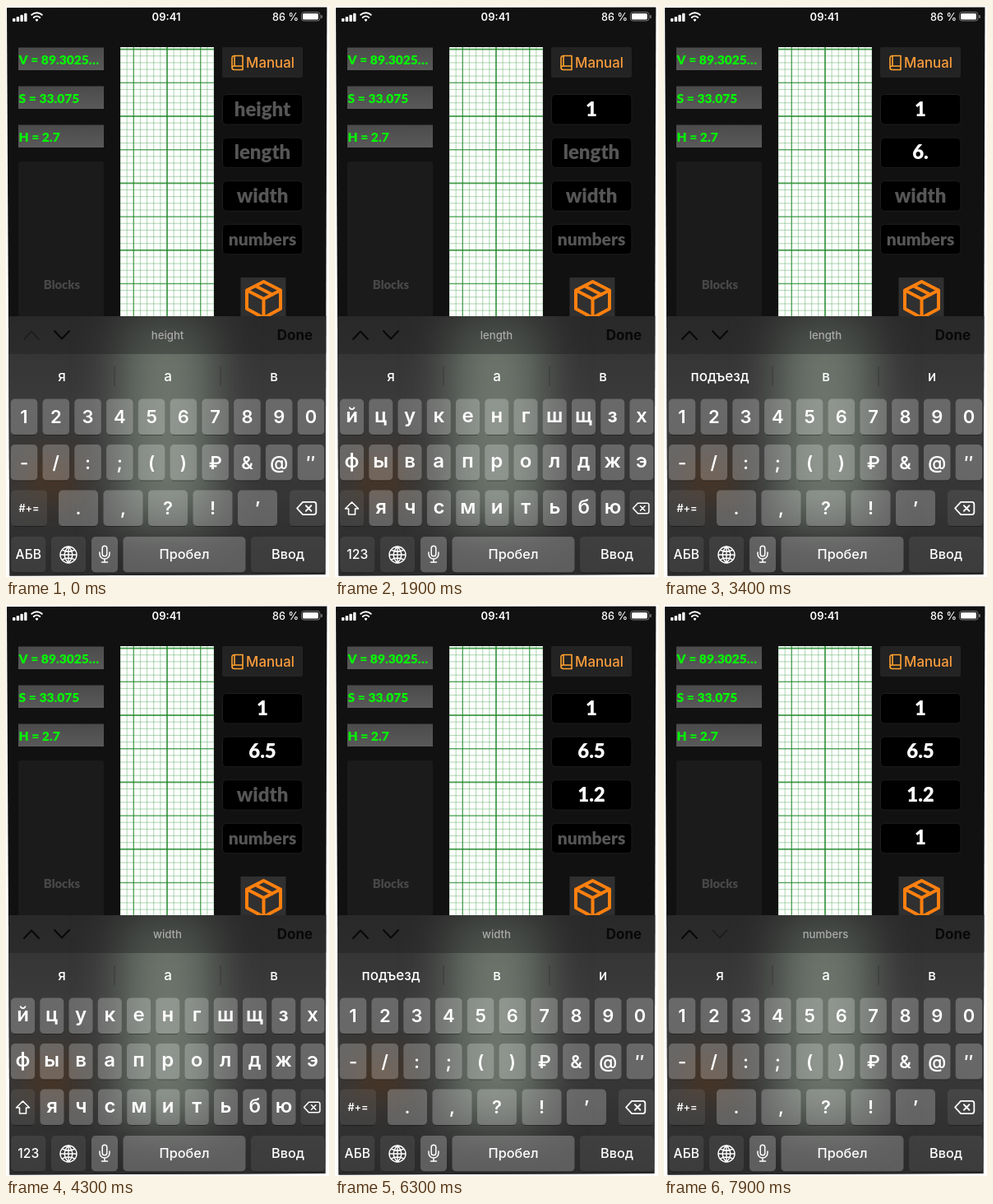
These frames come from a looping animation (393 by 694 pixels, 8000 ms). An HTML page with a canvas:

```html
<!DOCTYPE html>
<html lang="en">
<head>
<meta charset="utf-8">
<title>Block calculator</title>
<style>
html, body { margin: 0; width: 100%; height: 100%; overflow: hidden; background: #fff; }
canvas { display: block; width: 393px; height: 694px; }
</style>
</head>
<body>
<canvas id="stage"></canvas>
<script>
const W = 393, H = 694, LOOP = 8000;
const stage = document.getElementById('stage');
const dpr = window.devicePixelRatio || 1;
stage.width = W * dpr;
stage.height = H * dpr;
const c = stage.getContext('2d');

const UI = 'Inter, "Open Sans", sans-serif';
const GEO = 'Lato, "Open Sans", sans-serif';
const ORANGE = '#ff800f';
const labels = ['height', 'length', 'width', 'numbers'];

// time, active field, its value, letter keyboard, number suggestions
const steps = [
  [0, 0, '', 0, 0],
  [900, 0, '1', 0, 0],
  [1500, 1, '', 1, 0],
  [2300, 1, '', 0, 0],
  [2700, 1, '6', 0, 0],
  [3200, 1, '6.', 0, 1],
  [3700, 1, '6.5', 0, 1],
  [4100, 2, '', 1, 0],
  [4800, 2, '', 0, 0],
  [5500, 2, '1', 0, 0],
  [5900, 2, '1.', 0, 1],
  [6200, 2, '1.2', 0, 1],
  [6600, 3, '', 1, 0],
  [7200, 3, '', 0, 0],
  [7700, 3, '1', 0, 0]
];

function text(s, x, y, size, color, weight = 500, font = UI, align = 'center') {
  c.font = `${weight} ${size}px ${font}`;
  c.textAlign = align;
  c.textBaseline = 'alphabetic';
  c.fillStyle = color;
  c.fillText(s, x, y);
}

function box(x, y, w, h, r, fill) {
  c.beginPath();
  c.roundRect(x, y, w, h, r);
  c.fillStyle = fill;
  c.fill();
}

function line(path, color, width = 2, x = 0, y = 0) {
  c.save();
  c.translate(x, y);
  c.strokeStyle = color;
  c.lineWidth = width;
  c.lineCap = c.lineJoin = 'round';
  c.stroke(new Path2D(path));
  c.restore();
}

function gradient(g, ...colors) {
  colors.forEach((color, i) => g.addColorStop(i / (colors.length - 1), color));
  return g;
}

function statusBar() {
  for (let i = 0; i < 4; i++) box(8 + i * 4.7, 15 - i * 2.1, 3.4, 4 + i * 2.1, 1, '#fff');
  line('M-6.3 -4.5A9.5 9.5 0 0 1 6.3 -4.5M-3.7 -1.2A5.5 5.5 0 0 1 3.7 -1.2', '#fff', 2, 37.5, 15.2);
  line('M-.7 0L0 1L.7 0Z', '#fff', 2, 37.5, 16.8);
  text('09:41', 195, 17.5, 13, '#fff', 600);
  text('86 %', 356, 17.5, 12.7, '#fff', 500, UI, 'right');
  c.beginPath();
  c.roundRect(359.5, 7.5, 22.5, 10.5, 3);
  c.strokeStyle = '#777';
  c.lineWidth = 1;
  c.stroke();
  box(361, 9, 19, 7.5, 1.5, '#fff');
  box(383.3, 11, 1.5, 4, 1, '#888');
}

function results() {
  ['V = 89.3025…', 'S = 33.075', 'H = 2.7'].forEach((s, i) => {
    const y = 50.5 + i * 47;
    box(15, y, 104, 27.5, 0, gradient(c.createLinearGradient(0, y, 0, y + 27), '#4b4b4b', '#595959'));
    text(s, 15.5, y + 20, 15.6, '#0f0', 900, GEO, 'left');
  });
  box(15, 189, 104, 190, 3, '#1b1b1b');
  text('Blocks', 68, 344, 14.8, '#484848', 900, GEO);
}

function graphPaper() {
  c.save();
  c.beginPath();
  c.rect(139, 50, 114, 328);
  c.fillStyle = '#fdfffd';
  c.fill();
  c.clip();
  const cell = 8.14;
  const rule = (i, x, y, w, h) => {
    const kind = i % 10 === 0 ? 2 : i % 5 === 0 ? 1 : 0;
    c.fillStyle = ['rgba(40,140,50,.36)', 'rgba(30,135,40,.75)', 'rgba(30,135,40,.82)'][kind];
    const t = [1, 1.4, 1.8][kind];
    c.fillRect(x - (w ? 0 : t / 2), y - (h ? 0 : t / 2), w || t, h || t);
  };
  for (let i = -7; i <= 7; i++) rule(i, 196 + i * cell, 50, 0, 328);
  for (let i = -11; i <= 30; i++) rule(i, 139, 134 + i * cell, 114, 0);
  c.restore();
}

function controls(active, values) {
  box(263, 50, 98, 37, 2, '#232323');
  line('M13 0H3Q0 0 0 3V14.5Q0 17 3 17H13ZM0 14.5Q0 12.5 3 12.5H13M3 1V12', '#ffa22e', 1.6, 275, 60.5);
  text('Manual', 321.5, 75, 16.8, '#f99c3c', 500);
  labels.forEach((label, i) => {
    const y = 107.5 + i * 52.6;
    box(263.5, y, 97.5, 36.5, 5, '#000');
    c.strokeStyle = '#1d1d1d';
    c.lineWidth = 1;
    c.stroke();
    const size = !values[i] && i === 3 ? 21 : 24;
    text(values[i] || label, 312, y + 26, size, values[i] ? '#fff' : '#565656', 900, GEO);
  });
  box(285.5, 330, 55, 50, 0, '#303030');
  line('M0 -21L20.5 -10.5V12L0 23L-20.5 12V-10.5ZM-20.5 -10.5L0 0L20.5 -10.5M0 0V23M-10 -15.7L10.5 -5.2',
    ORANGE, 4, 313.5, 356);
}

function key(s, x, y, w, size = 22, dark = false, weight = 600, lift = 0) {
  box(x - w / 2, y, w, 43.5, 5, `rgba(255,255,255,${dark ? .08 : .24})`);
  box(x - w / 2 + 3, y + 43.5, w - 6, 1, 0, 'rgba(0,0,0,.35)');
  if (s) text(s, x, y + 22 + size * .36 - lift, size, '#fff', weight);
}

function row(chars, first, last, y, w, size, lift) {
  [...chars].forEach((s, i) =>
    key(s, first + (last - first) * i / (chars.length - 1), y, w, size, false, 600, lift));
}

function backspace(x, y, k) {
  c.save();
  c.translate(x, y);
  c.scale(k, k);
  line('M-11 0L-4.5 -7H8Q10.5 -7 10.5 -4.5V4.5Q10.5 7 8 7H-4.5ZM-1 -3L5 3M5 -3L-1 3', '#fff', 1.7);
  c.restore();
}

function blurred(x, y, w, h, radius, color) {
  c.filter = `blur(${radius * dpr}px)`;
  c.fillStyle = color;
  c.fillRect(x, y, w, h);
  c.filter = 'none';
}

// The frosted panel lets the paper behind it shine through.
function keyboardBack() {
  c.save();
  c.beginPath();
  c.rect(0, 377, W, 317);
  c.clip();
  c.fillStyle = gradient(c.createLinearGradient(0, 377, 0, 694), '#323232', '#3a3a3a', '#363636', '#2a2a2a');
  c.fillRect(0, 377, W, 317);
  blurred(140, 375, 112, 255, 27, 'rgba(135,147,135,.66)');
  blurred(25, 545, 60, 55, 18, 'rgba(100,52,10,.4)');
  c.fillStyle = 'rgba(25,25,25,.36)';
  c.fillRect(0, 377, W, 46);
  c.restore();
}

function keyboard(active, letters, numeric) {
  keyboardBack();
  const arrow = (path, x, on) => line(path, on ? '#080808' : '#191919', on ? 2 : 1.3, x, 400);
  arrow('M-9 5L0 -4.5L9 5', 31, active > 0);
  arrow('M-9 -5L0 4.5L9 -5', 68, active < 3);
  text(labels[active], 196.5, 405, 13.2, '#aaa', 500);
  text('Done', 351.5, 406, 17, '#080808', 700);

  (numeric ? ['подъезд', 'в', 'и'] : ['я', 'а', 'в']).forEach((s, i) =>
    text(s, 68 + i * 129, 455.5, 17, '#fff', 500));
  c.fillStyle = 'rgba(20,20,20,.35)';
  c.fillRect(131.5, 438, 1, 24);
  c.fillRect(260.5, 438, 1, 24);

  if (letters) {
    row('йцукенгшщзх', 20.5, 373, 477.5, 29, 24, 2.5);
    row('фывапролджэ', 20.5, 373, 533, 29, 24, 2.5);
    row('ячсмитьбю', 56, 338, 588.5, 29, 24, 2.5);
    key('', 20.5, 588.5, 29, 0, true);
    line('M0 -8L8 0H4V7H-4V0H-8Z', '#fff', 1.6, 20.5, 611);
    key('', 373, 588.5, 29, 0, true);
    backspace(372.5, 610.5, .9);
  } else {
    row('1234567890', 22, 371, 477.5, 32.5, 22);
    row('-/:;()₽&@″', 22, 371, 533, 32.5, 22);
    row('.,?!’', 88, 306, 588.5, 48, 22);
    key('#+=', 28, 588.5, 44, 12.6, true, 600);
    key('', 366.5, 588.5, 43, 0, true);
    backspace(366, 610.5, 1.08);
  }

  key(letters ? '123' : 'АБВ', 27.3, 645, 42, 15.6, true, 500, .8);
  key('', 76, 645, 42, 0, true);
  line('M-10 0A10 10 0 1 0 10 0A10 10 0 1 0 -10 0ZM0 -10V10M-10 0H10M0 -10Q-9.5 0 0 10Q9.5 0 0 -10M-8 -6Q0 -2 8 -6M-8 6Q0 2 8 6',
    '#fff', 1.4, 76, 667);
  key('', 120, 645, 32, 0);
  line('M-2.8 -7A2.8 2.8 0 0 1 2.8 -7V0A2.8 2.8 0 0 1 -2.8 0ZM-6 -2V0A6 6 0 0 0 6 0V-2M0 6V10M-3.5 10H3.5',
    '#fff', 1.5, 120, 666);
  key('Пробел', 217, 645, 149, 16.3, false, 500, .8);
  key('Ввод', 343, 645, 90, 16.3, true, 500, .8);
}

function draw(now) {
  const t = now % LOOP;
  const values = [];
  let step;
  for (const s of steps) {
    if (s[0] > t) break;
    step = s;
    values[s[1]] = s[2];
  }
  const [, active, , letters, numeric] = step;

  c.setTransform(dpr, 0, 0, dpr, 0, 0);
  c.fillStyle = '#fff';
  c.fillRect(0, 0, W, H);
  c.save();
  c.clip(new Path2D('M1 2L390.5 1.5L388.5 691L4.5 692.5Z'));
  c.fillStyle = '#111';
  c.fillRect(0, 0, W, H);
  statusBar();
  results();
  graphPaper();
  controls(active, values);
  keyboard(active, letters, numeric);
  c.restore();
  requestAnimationFrame(draw);
}
requestAnimationFrame(draw);
</script>
</body>
</html>
```
